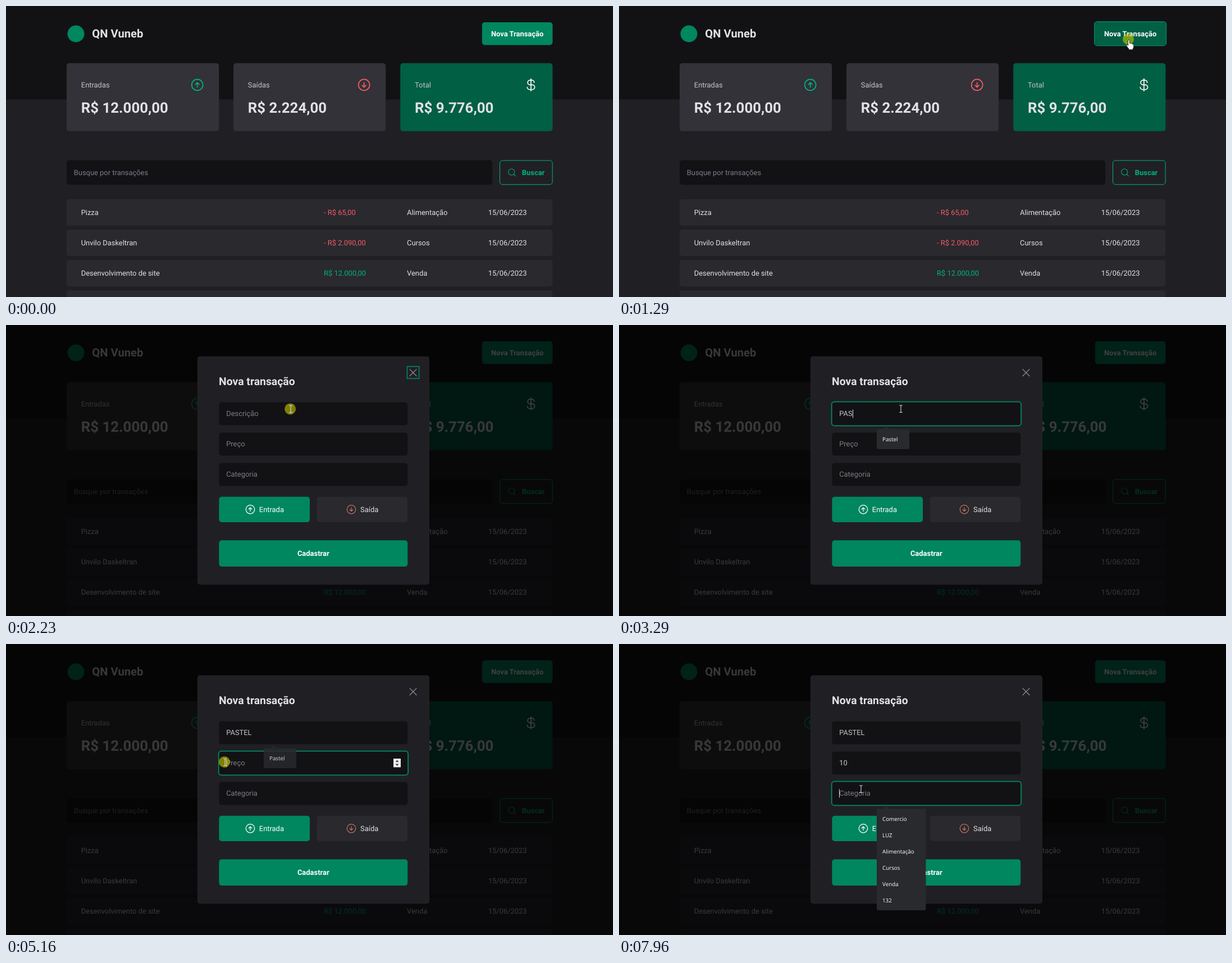
These frames come from a looping animation (1081 by 518 pixels, 8000 ms). An HTML page:

```html
<!DOCTYPE html>
<html lang="pt-BR">
<head>
<meta charset="utf-8">
<title>Nova transação</title>
<style>
  html, body { margin: 0; width: 100%; height: 100%; overflow: hidden; background: #202024; }
  svg { display: block; width: 100vw; height: 100vh; }
  text { font: 12.91px Roboto, sans-serif; fill: #e1e1e6; text-rendering: geometricPrecision; white-space: pre; }
  .b { font-weight: 700; }
  .sys { font-family: "Open Sans", sans-serif; font-size: 9.8px; fill: #fff; }
  .icon { fill: none; stroke-width: 16; stroke-linecap: round; stroke-linejoin: round; }
</style>
</head>
<body>
<svg id="stage" viewBox="0 0 1081 518" xmlns="http://www.w3.org/2000/svg"></svg>
<script>
const LOOP = 8000, OPEN = 1340, BLINK = 480;
const GREEN = '#00875f', DARK = '#015f43', LIGHT = '#00b37e', RED = '#f75a68', MUTED = '#7c7c8a';

const rect = (x, y, w, h, fill, more = '') =>
  `<rect x="${x}" y="${y}" width="${w}" height="${h}" rx="4.8" fill="${fill}" ${more}/>`;
const text = (x, y, s, fill = '#e1e1e6', more = '') =>
  `<text x="${x}" y="${y}" style="fill:${fill}" ${more}>${s}</text>`;
const bold = (x, y, s, size, fill, more = '') =>
  `<text class="b" x="${x}" y="${y}" style="font-size:${size}px;fill:${fill}" ${more}>${s}</text>`;

const UP = '<circle cx="128" cy="128" r="96"/><path d="M128 168V88M94 122l34-34 34 34"/>';
const DOWN = `<g transform="rotate(180 128 128)">${UP}</g>`;
const DOLLAR = '<path d="M128 24V232M184 88a40 40 0 0 0-40-40H112a40 40 0 0 0 0 80h40a40 40 0 0 1 0 80H104a40 40 0 0 1-40-40"/>';
const LENS = '<circle cx="116" cy="116" r="84"/><path d="M175.4 175.4L224 224"/>';
const CROSS = '<path d="M200 56L56 200M200 200L56 56"/>';
const icon = (cx, cy, size, shape, color) =>
  `<g class="icon" stroke="${color}" transform="translate(${cx - size / 2} ${cy - size / 2}) scale(${size / 256})">${shape}</g>`;

const card = (x, label, value, shape, color, fill) =>
  rect(x, 101.8, 271.2, 121, fill) + text(x + 25.8, 145.2, label, '#c4c4cc') +
  bold(x + 25.8, 190, value, 25.8, '#e1e1e6') + icon(x + 232.7, 140.4, 26.6, shape, color);

const row = ([name, price, kind], i) => {
  const y = 344 + i * 54, base = y + 28;
  return rect(108, y, 865.3, 47.2, '#29292e') + text(133.7, base, name) +
    text(566, base, price, price[0] === '-' ? RED : LIGHT) +
    text(714, base, kind) + text(858.8, base, '15/06/2023');
};

const page =
  '<path fill="#202024" d="M0 0H1081V518H0Z"/><path fill="#121214" d="M0 0H1081V166.3H0Z"/>' +
  `<circle cx="124.5" cy="49.5" r="15" fill="${GREEN}"/>` + bold(153.3, 56.2, 'QN Vuneb', 20.2, '#e1e1e6') +
  rect(847.8, 29, 125.6, 40.4, GREEN, 'id="open"') +
  bold(910.6, 53.8, 'Nova Transação', 12.91, '#fff', 'text-anchor="middle"') +
  card(108, 'Entradas', 'R$ 12.000,00', UP, LIGHT, '#323238') +
  card(405, 'Saídas', 'R$ 2.224,00', DOWN, RED, '#323238') +
  card(702.2, 'Total', 'R$ 9.776,00', DOLLAR, '#fff', DARK) +
  rect(108, 274.6, 758, 43.6, '#121214') + text(120.8, 300.9, 'Busque por transações', MUTED) +
  rect(879.5, 275, 93.6, 42.8, 'none', `stroke="${LIGHT}"`) +
  icon(901, 296.3, 16.8, LENS, LIGHT) + bold(918.8, 300.9, 'Buscar', 12.91, LIGHT) +
  [['Pizza', '- R$ 65,00', 'Alimentação'], ['Unvilo Daskeltran', '- R$ 2.090,00', 'Cursos'],
   ['Desenvolvimento de site', 'R$ 12.000,00', 'Venda'], ['', '', '']]
    .map(row).join('').replace(/<text[^>]*><\/text>/g, '');

const LABELS = ['Descrição', 'Preço', 'Categoria'];
const fieldY = i => 137.4 + i * 54;
const ringOn = `stroke="${GREEN}" stroke-width="1.8"`;
const modal =
  '<path fill="#000" opacity=".75" d="M0 0H1081V518H0Z"/>' +
  rect(340.8, 55.8, 413.2, 406.4, '#202024') + bold(379, 106.6, 'Nova transação', 19.37, '#e1e1e6') +
  icon(725, 84.8, 21, CROSS, '#8d8d99') +
  `<rect id="xring" x="714.4" y="73.9" width="21.2" height="21.4" fill="none" stroke="${GREEN}" stroke-width="1.6"/>` +
  LABELS.map((s, i) => rect(379.4, fieldY(i), 335.8, 41.2, '#121214', `id="box${i}"`) +
    text(392.2, fieldY(i) + 24.6, s, MUTED, `id="val${i}"`)).join('') +
  rect(378.7, 0, 337.4, 42.6, 'none', `id="ring" ${ringOn}`) +
  '<g id="spin"><path fill="#efefef" d="M690 204h13v15.4h-13Z"/><path fill="#444" d="M693.5 210l3-3.4 3 3.4ZM693.5 213.6l3 3.4 3-3.4Z"/></g>' +
  '<rect id="caret" width="1" height="15" fill="#e1e1e6"/>' +
  rect(379.4, 305.8, 161.6, 45.2, GREEN) + icon(435, 328.3, 20.6, UP, '#fff') + text(450.8, 332.6, 'Entrada', '#fff') +
  rect(553.8, 305.8, 161.4, 45.2, '#29292e') + icon(615, 328.3, 20.6, DOWN, '#c0715f') + text(631, 332.6, 'Saída') +
  rect(379.4, 383.3, 335.8, 46.8, GREEN) +
  bold(547.3, 410.8, 'Cadastrar', 12.91, '#fff', 'text-anchor="middle"') + '<g id="list"></g>';

const pointers =
  '<circle id="press" r="10" fill="#c8c800" opacity=".6"/><g id="pointer">' +
  '<path id="arrow" d="M0 0V14.5L3.4 11.4 5.8 16.6 8 15.6 5.7 10.6H10.2Z" fill="#fff" stroke="#000" stroke-width=".7"/>' +
  '<path id="hand" d="M-1.4 2Q0 .2 1.4 2V7.6Q2.8 6.4 4 8 5.6 7.2 6.5 8.8 8.6 8.4 8.6 10.5V13.5Q8.4 15.5 7.2 17V18.8H-.2V17.2Q-2.4 14.6-4.6 11.2-4.4 9.3-2.8 10L-1.4 11.4Z" fill="#fff" stroke="#000" stroke-width=".7"/>' +
  '<path id="beam" d="M-2.8-6H-.7L0-5.4 .7-6H2.8M0-5.4V5.9M-2.8 6.5H-.7L0 5.9 .7 6.5H2.8" fill="none" stroke="#d8d8dc" stroke-width="1.1"/></g>';

document.getElementById('stage').innerHTML =
  `<g>${page}</g>` + rect(846.9, 28.1, 127.4, 42.2, 'none', `id="openRing" ${ringOn}`) +
  `<g id="modal">${modal}</g>` + pointers;

const el = {};
document.querySelectorAll('[id]').forEach(n => el[n.id] = n);
const show = (node, on) => node.setAttribute('display', on ? 'inline' : 'none');
const set = (node, attrs) => { for (const k in attrs) node.setAttribute(k, attrs[k]); };

// time, x, y
const path = [
  [460, 801, 479], [650, 880, 385], [850, 962, 235], [1000, 938, 115], [1150, 910, 62], [1210, 908, 59],
  [1390, 908, 59], [1750, 720, 112], [2020, 530, 145], [2260, 504, 150], [2430, 502, 149],
  [4360, 502, 149], [4420, 474, 198], [4490, 438, 206], [4650, 334, 214], [4800, 335, 216],
  [5000, 378, 212], [5160, 390, 210], [5300, 392, 210], [6570, 392, 210], [6900, 425, 248],
  [7020, 430, 258], [7150, 431, 258], [LOOP, 431, 258]];

// time, focused field, its text; a repeated entry restarts the caret
const edits = [
  [2280, 0, ''], [2960, 0, 'P'], [3160, 0, 'PA'], [3290, 0, 'PAS'], [3610, 0, 'PAST'], [3740, 0, 'PASTE'],
  [3960, 0, 'PASTEL'], [5150, 1, ''], [5220, 1, ''], [5970, 1, '1'], [6030, 1, '10'], [6090, 1, '10'], [7000, 2, '']];

// from, to, field, width, height, items
const lists = [
  [2330, 2960, 0, 149, 169.5, ['Pizza', 'Pastel', 'Desenvolvimento de site', 'Aluguel', 'Mercado', 'Salário']],
  [2960, 3160, 0, 58, 64.5, ['Pizza', 'Pastel']],
  [3160, 5300, 0, 58, 35.5, ['Pastel']],
  [7070, LOOP, 2, 87.5, 180.5, ['Comercio', 'LUZ', 'Alimentação', 'Cursos', 'Venda', '132']]];
const presses = [[1290, OPEN], [2190, 2290], [5090, 5170], [6950, 7020]];

function pointerAt(t) {
  const i = path.findIndex(p => p[0] > t), a = path[i - 1], b = path[i];
  const k = (t - a[0]) / (b[0] - a[0]);
  return [a[1] + (b[1] - a[1]) * k, a[2] + (b[2] - a[2]) * k];
}

function drawList(t) {
  const open = lists.find(l => t >= l[0] && t < l[1]);
  show(el.list, open);
  if (!open) return;
  const [, , field, w, h, items] = open, top = fieldY(field) + 48.2;
  el.list.innerHTML =
    `<path fill="#292a2d" d="M469.5 ${top + 1}l6.5-5.6 6.5 5.6Z"/><rect x="459" y="${top}" width="${w}" height="${h}" rx="2.5" fill="#292a2d"/>` +
    items.map((s, i) => `<text class="sys" x="469" y="${top + 21.6 + i * 29}">${s}</text>`).join('');
  el.list.setAttribute('opacity', t > 5130 && t < 5300 ? (5300 - t) / 170 : 1);
}

function drawFields(t) {
  const done = edits.filter(e => e[0] <= t), last = done[done.length - 1];
  const preview = t >= 4420 && t < 4560;
  LABELS.forEach((label, i) => {
    const own = done.filter(e => e[1] === i).pop(), value = own ? own[2] : '';
    const filled = preview && i === 0, node = el['val' + i];
    node.textContent = filled ? 'Pastel' : value || label;
    node.style.cssText = filled ? 'font:10.9px "Open Sans",sans-serif;fill:#222'
      : `fill:${value ? '#c4c4cc' : MUTED}`;
    el['box' + i].setAttribute('fill', filled ? '#e8f0fe' : '#121214');
  });
  show(el.xring, !last);
  show(el.ring, last);
  show(el.spin, last && last[1] === 1);
  const lit = last && !preview && Math.floor((t - last[0]) / BLINK) % 2 === 0;
  show(el.caret, lit);
  if (!last) return;
  el.ring.setAttribute('y', fieldY(last[1]) - .7);
  const width = last[2] ? el['val' + last[1]].getComputedTextLength() : 0;
  set(el.caret, { x: Math.round(392.2 + width), y: fieldY(last[1]) + 13 });
}

function drawPointer(t) {
  show(el.pointer, t >= 460);
  const press = presses.some(p => t >= p[0] && t < p[1]);
  show(el.press, press);
  let kind = 'arrow';
  if (t >= 460) {
    const [x, y] = pointerAt(t);
    const within = (l, top, r, b) => x >= l && x <= r && y >= top && y <= b;
    if (t < OPEN) {
      if (within(848, 29, 973, 69)) kind = 'hand';
    } else if (within(714, 73, 736, 96)) kind = 'hand';
    else if (LABELS.some((_, i) => within(379, fieldY(i), 715, fieldY(i) + 41)) && !(t < 4490 && within(459, 185, 517, 221))) kind = 'beam';
    el.pointer.setAttribute('transform', `translate(${x} ${y})`);
    set(el.press, { cx: x - 1, cy: y });
  }
  for (const k of ['arrow', 'hand', 'beam']) show(el[k], k === kind);
  el.open.setAttribute('fill', kind === 'hand' && t < OPEN ? DARK : GREEN);
}

function draw(t) {
  show(el.openRing, t >= 1290 && t < OPEN);
  show(el.modal, t >= OPEN);
  if (t >= OPEN) { drawFields(t); drawList(t); }
  drawPointer(t);
}

const start = performance.now();
function tick() {
  draw((performance.now() - start) % LOOP);
  requestAnimationFrame(tick);
}
tick();
</script>
</body>
</html>
```
